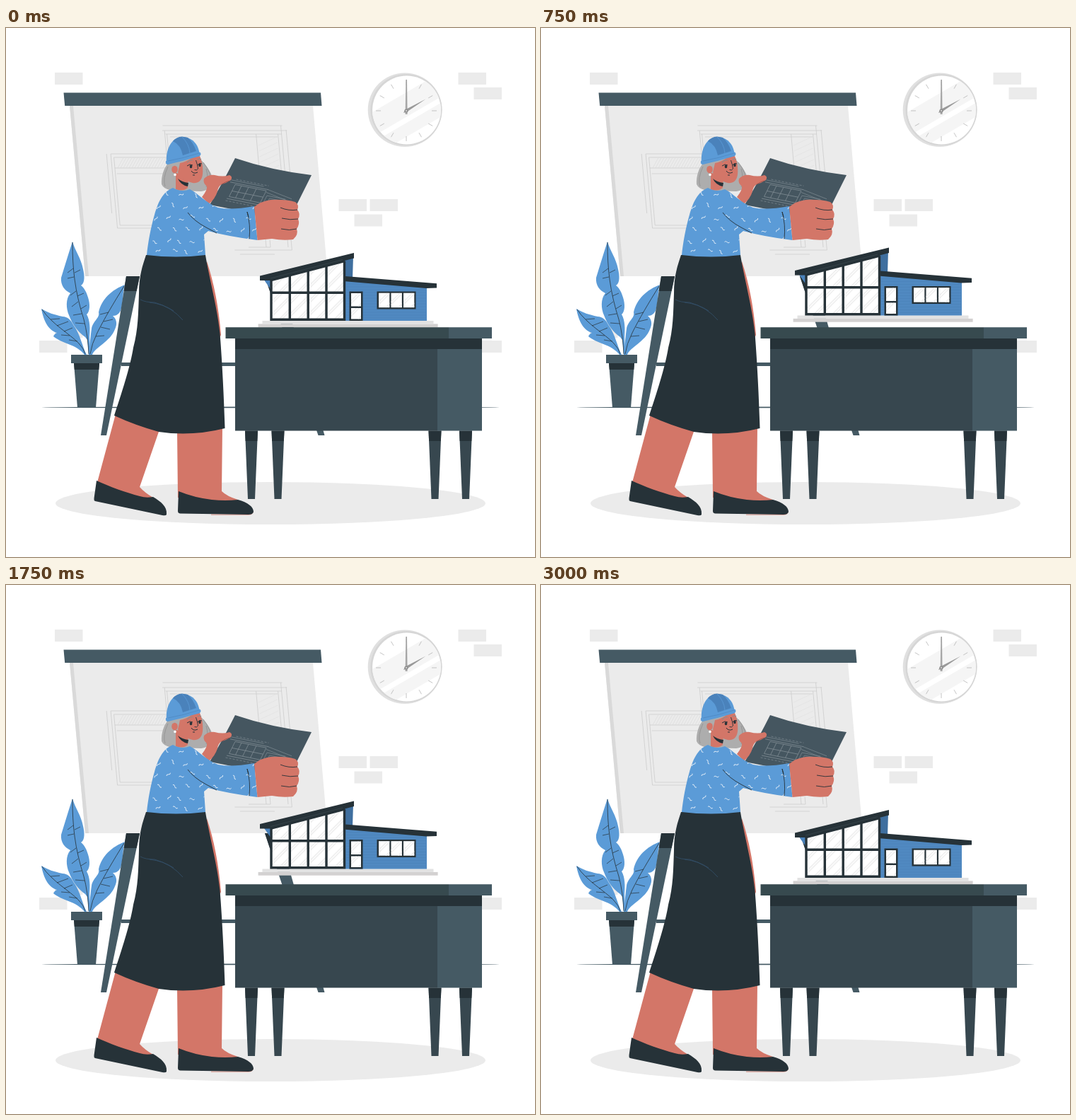
Recreate the animation shown at these times as an HTML page with a canvas. Size 748 by 748 pixels, loop 3040 ms.

```html
<!DOCTYPE html>
<html lang="en">
<head>
<meta charset="utf-8">
<title>Architect with floating house model</title>
<style>
html, body { margin: 0; width: 100%; height: 100%; overflow: hidden; background: #fff; }
canvas { display: block; width: 100vw; height: 100vh; }
</style>
</head>
<body>
<canvas id="c" width="748" height="748"></canvas>
<script>
const ctx = document.getElementById('c').getContext('2d');
const LOOP = 3040, STEPS = 73, LIFT = 15;
const INK = '#263238', SLATE = '#37474f', STEEL = '#455a64', PALE = '#ebebeb';
const BLUE = '#5b9bd7', DEEP = '#4a82bb', WALL = '#5089c1', SKIN = '#d37668', HAIR = '#adadad';

const fill = (d, color) => { ctx.fillStyle = color; ctx.fill(new Path2D(d)); };
const line = (d, color, w = 1) => {
  ctx.strokeStyle = color;
  ctx.lineWidth = w;
  ctx.stroke(new Path2D(d));
};
const box = (x, y, x2, y2, color) => { ctx.fillStyle = color; ctx.fillRect(x, y, x2 - x, y2 - y); };
const disc = (x, y, rx, color, ry = rx) => {
  ctx.fillStyle = color;
  ctx.beginPath();
  ctx.ellipse(x, y, rx, ry, 0, 0, 7);
  ctx.fill();
};
const within = (d, draw) => {
  ctx.save();
  ctx.clip(new Path2D(d));
  draw();
  ctx.restore();
};
const seeded = s => () => (s = (s * 16807) % 2147483647) / 2147483647;

function room() {
  box(0, 0, 748, 748, '#fff');
  for (const [x, y] of [[69, 63], [639.5, 63], [661.5, 84], [470.5, 242], [514.5, 242],
    [492.5, 263.5], [47, 442], [69, 421], [661.5, 442]]) box(x, y, x + 39.5, y + 17, PALE);
  fill('M50 536.4Q90 535.6 374 535.6Q660 535.6 698 536.4Q660 537.2 374 537.2Q90 537.2 50 536.4Z', STEEL);
  disc(374, 672, 304, PALE, 30);
}

function clock() {
  disc(564, 115.7, 52.3, '#e0e0e0');
  disc(566, 115.7, 50.6, '#d6d6d6');
  disc(566.5, 116, 48.4, '#fff');
  within('M518 116a48.4 48.4 0 1 0 97 0a48.4 48.4 0 1 0 -97 0Z', () => {
    line('M510 141L625 74', '#f5f5f5', 30);
    line('M520 171L635 104', '#f5f5f5', 17);
  });
  for (let i = 0; i < 12; i++) {
    const a = i * Math.PI / 6, c = Math.cos(a), s = Math.sin(a);
    line(`M${566 + 36 * c} ${117 + 36 * s}L${566 + 43 * c} ${117 + 43 * s}`, '#b5b5b5', .8);
  }
  fill('M565.4 73H567L567.6 122H564.6Z', '#a6a6a6');
  fill('M593.5 100.5L567 118.5L562 120L564.5 115.5Z', '#999');
  disc(566, 117, 2.6, '#8f8f8f');
  disc(566, 117, 1, '#ddd');
}

function board() {
  fill('M170 351H189L142 576H134Z', STEEL);
  fill('M170 351H189L184.6 372H166.6Z', INK);
  fill('M366 351H386L450.5 576H441.5Z', STEEL);
  fill('M366 351H386L392 372H373Z', INK);
  box(163, 473, 430, 478, STEEL);
  fill('M90 110H434L455 351H112Z', PALE);
  fill('M90 110H95L117 351H112Z', '#d9d9d9');
  fill('M81.5 91.6H445L446.5 110H83.2Z', STEEL);

  // Sketch drawn upright, then leaned like the sheet
  ctx.save();
  ctx.transform(1, 0, .09, 1, -9.9, 0);
  const c = '#cdcdcd';
  line('M219 138H388M218 145H394M222 150H386M228 154H380', c, .8);
  line('M221 145V300M224 150V290M386 138V314M381 150V310M350 150V310M393 144V210', c, .8);
  line('M142 178H222M146 183H222M146 198H221M148 206H220M142 178V283M146 183V279M136 178V262', c, .8);
  line('M142 283H200M146 279H200M325 310H356V300M305 314H386M312 320H361', c, .8);
  for (let x = 150; x < 222; x += 4) line(`M${x} 198L${x + 9} 184`, '#dadada', .6);
  for (let y = 154; y < 200; y += 8) line(`M352 ${y + 12}L379 ${y}`, '#e0e0e0', .6);
  ctx.restore();
}

function plant() {
  fill('M168 363C150 370 135 383 131 402C133 410 123 414 121 425C119 440 118 452 117 462H122C125 452 148 443 154 426C158 418 156 411 151 407C158 407 162 402 163 396C166 384 165 372 168 363Z', BLUE);
  fill('M94 302C88 320 83 337 78 353C77 364 83 371 91 375C84 383 85 397 89 406C94 420 103 431 112 437L115 441L117 462H119L118 437C119 427 119 413 114 405C119 401 119 390 116 381C114 374 111 368 106 364C112 361 111 349 109 341C106 325 98 316 94 302Z', BLUE);
  fill('M50 397C53 413 59 427 72 431C69 432 68 434 67 436C78 446 100 447 111 462H114C108 451 105 433 96 421C92 413 87 408 80 408C67 405 60 403 50 397Z', BLUE);
  line('M94 303C94 340 97 371 110 412Q116 435 117 461', INK, .8);
  line('M51 398C65 419 91 433 103 446Q110 453 112 461', INK, .8);
  line('M167 365C152 389 139 411 129 431Q121 447 119 461', INK, .8);
  line('M95 340L87 346M96 352L87 354M99 372L91 378M102 387L93 394M107 404L95 406M111 418L98 417M97 346L105 342M101 379L110 375M106 397L114 392', INK, .7);
  line('M63 412L76 411M72 421L88 415M82 429L94 424M90 435L78 434M101 443L89 441M145 402L133 405M138 415L151 412M134 423L147 426M127 436L139 435', INK, .7);
  fill('M96 474H132L127 537H101Z', STEEL);
  fill('M96 474H132L131.3 483H96.8Z', INK);
  box(92, 462, 136, 474, STEEL);
}

function glare(x, y, w, h) {
  box(x, y, x + w, y + h, '#fff');
  within(`M${x} ${y}h${w}v${h}h${-w}Z`, () => {
    for (let k = -1; k < 3; k++) {
      const p = x + k * 18;
      line(`M${p - 8} ${y + h}l${h} ${-h}M${p - 4} ${y + h}l${h} ${-h}`, '#f0f0f0', 1.6);
    }
  });
}

function house() {
  box(356.6, 418.4, 610.6, 423.2, '#d3d1d1');
  box(362.5, 414, 604.5, 418.4, '#e2e2e2');
  fill('M479 325L491 322L490 354H479Z', '#3f6f9f');
  fill('M480 355L595 364V414H480Z', WALL);
  for (let y = 362; y < 413; y += 4) line(`M481 ${y}H594`, '#4a81b7', .6);
  fill('M364 355L376 353V372Z', DEEP);

  within('M374 357L479 330V414H374Z', () => {
    for (let i = 0; i < 4; i++) {
      glare(375 + i * 26, 330, 26, 44);
      glare(375 + i * 26, 375, 26, 38);
    }
  });
  line('M375 356V414M401.3 350V413M427.2 343V413M453 336V413M478.5 330V414M374 374.3H479M373.5 412.3H480', INK, 3.4);
  line('M374 357L479.5 329.5', INK, 3);
  fill('M359 350.5L492 318V325.5L373 357L359 357Z', INK);
  line('M374 354L476 327.5', '#46545b', .5);

  fill('M480 351L609 361.3V367.5L594 368L480 358.2Z', INK);
  box(485.5, 372.5, 504.5, 414, INK);
  glare(488, 375, 14, 18.5);
  glare(488, 396, 14, 15.5);
  box(524.5, 372.5, 579.5, 397.5, INK);
  for (const x of [527, 544.5, 562]) glare(x, 374.7, 15.3, 20.5);
}

function table() {
  for (const x of [338, 375.5, 597.5, 641]) {
    fill(`M${x} 569.5h18l-4 96.5h-10Z`, SLATE);
    fill(`M${x} 569.5h18l-.7 14.5h-16.7Z`, INK);
  }
  box(324, 439, 610, 569.5, SLATE);
  box(610, 439, 673, 569.5, STEEL);
  box(324, 439, 673, 454, INK);
  box(310.5, 423.2, 626, 439, '#374a4f');
  box(626, 423.2, 687, 439, STEEL);
}

function legs() {
  fill('M155 546L217 568L189 649Q196 657 208 664L180 670L127 650Z', SKIN);
  fill('M242 570L306 563L305 655Q312 662 328 667L300 674L243 664Z', SKIN);
  fill('M128 640C145 648 170 657 189 662Q198 665 208 663C219 670 228 676 227 688Q226 690 221 689L126 669Q124 668 124.5 665Z', INK);
  line('M290 688.2H343Q348.5 688 349.5 684', SKIN, .8);
  fill('M244 655Q266 664 291 667Q310 669 328 667C342 671 350 677 350 684Q349 688 343 688L246 686.5Q243 686 243 683Z', INK);
}

function skirt() {
  fill('M284 330Q299 375 304 434L301 440L284 360Z', SKIN);
  fill('M198 321H282C287 352 299 396 302.5 432C306 478 308 520 309.5 566Q262 578 216 571Q182 561.5 153 548C163 518 176 478 180 452C187 425 187 404 188 375C188 351 193 336 198 321Z', INK);
  line('M190 384Q197 388 210 388Q235 395 250 413M203 388Q222 390 237 400', '#34516b', .8);
}

function head() {
  fill('M232 188C223 196 219 211 220 221C224 230 237 230 246 230L276 231Q292 228 294 218C292 207 284 194 274 185Z', HAIR);
  line('M229 196Q221 213 225 224M279 190Q291 205 290 220M283 199Q287 213 283 225', '#8c8c8c', .7);
  fill('M240 205L258 207L257 226Q250 232 240 228Z', SKIN);
  fill('M243 213Q249 218 258 219L257 224Q247 222 243 213Z', INK);
  fill('M240 191L273 179C277 187 279 197 278 207C277 217 270 220 264 219C254 217 246 211 243 204Z', SKIN);
  fill('M233 191L265 182Q254 190 246 191L243 204L237 200Z', HAIR);
  disc(238.5, 200, 4.3, SKIN, 5.2);
  disc(239, 207.5, 1.8, '#fff');
  disc(261.5, 196, 1.8, INK, 2.3);
  disc(274, 194, 1.7, INK, 2.2);
  line('M256 195L260 193L264 194M270.5 194L274 191.5L277 192', INK, 1);
  line('M256 190Q260 186 264 187M271 186Q274 184 276 186', '#8c8c8c', 1.1);
  line('M268.5 187Q271 194 271.5 199Q270 202 266.5 200.5', INK, .9);
  line('M262 202Q265 207 271 204M264 208H267', INK, 1);

  fill('M227 192C225 172 234 154 250 154C266 155 273 167 274 181Q254 186 227 192Z', BLUE);
  fill('M236 160Q241 154 249 153.5L257 155Q265 162 269 174L250 180Q247 165 236 160Z', DEEP);
  line('M249 154Q259 164 260 177', BLUE, .8);
  fill('M226 188Q250 183 274 175.5Q277 178 274 181Q251 188 229 193Q225 193 226 188Z', BLUE);
  line('M229 188Q252 184 273 177', DEEP, .6);
}

function paper() {
  fill('M324 184Q374 201 432 208L411 250Q380 267 350 262L288 250Q308 216 324 184Z', '#455660');
  ctx.save();
  ctx.transform(1, .2, -.5, 1, 312, 241);
  const c = '#7f8c93';
  line('M0 0H76M-6 -22H48M2 -3H46V-20H2ZM11 -3V-20M21 -3V-20M32 -3V-20M2 -11H46', c, .7);
  line('M47 -18L82 -12M50 -14H76V-2H50ZM55 -11H70V-6H55ZM-6 -25H40M47 -22L84 -16', c, .6);
  ctx.setLineDash([3, 2]);
  line('M0 -27H46M0 3H68', c, .6);
  ctx.restore();
}

function farHand() {
  fill('M277 239Q285 229 284 224Q278 219 280 213Q286 207 295 208Q307 211 316 208Q321 210 318 215Q312 219 305 221Q300 224 299 231Q296 241 287 249Z', SKIN);
  line('M305 221Q311 217 316 216', '#8f4944', .7);
}

function shirt() {
  const shape = 'M236 226Q248 233 260 228C273 235 282 247 300 254Q318 258 351 252L355.5 300Q315 295 286 287L280 292L282 321Q240 326 199 321C201 302 205 281 210 264C215 247 221 232 236 226Z';
  fill(shape, BLUE);
  within(shape, () => {
    const rnd = seeded(77);
    for (let row = 0; row < 6; row++) {
      for (let x = 206 + row % 2 * 9; x < 355; x += 19) {
        ctx.save();
        ctx.translate(x + rnd() * 6, 234 + row * 16 + rnd() * 6);
        ctx.rotate((rnd() - .5) * 2);
        line('M-3.5 0Q-2 -2 0 0T3.5 0', '#e4eef8', .9);
        ctx.restore();
      }
    }
  });
  line('M257 261Q266 273 283 282L298 290M341 260Q346 278 344 298', INK, .9);
  line('M341 260L343 267', INK, 1);
}

function nearHand() {
  fill('M351 253Q360 245 374 243Q396 242 409 246Q415 250 412 257Q417 263 413 270Q416 277 411 284Q414 292 406 299Q392 301 376 298L355.5 300Z', SKIN);
  line('M388 254Q400 259 412 257M390 269Q402 272 413 270M389 284Q401 287 411 284', INK, .9);
}

function frame(now) {
  // The last step rests in the same pose as the first
  const step = Math.floor(now % LOOP / LOOP * STEPS);
  const lift = LIFT * (1 - Math.abs(2 * step / (STEPS - 1) - 1));
  room();
  clock();
  plant();
  board();
  ctx.save();
  ctx.translate(0, -lift);
  house();
  ctx.restore();
  table();
  legs();
  skirt();
  head();
  paper();
  farHand();
  shirt();
  nearHand();
}

let start;
function tick(now) {
  start ??= now;
  frame(now - start);
  requestAnimationFrame(tick);
}
frame(0);
requestAnimationFrame(tick);
</script>
</body>
</html>
```
